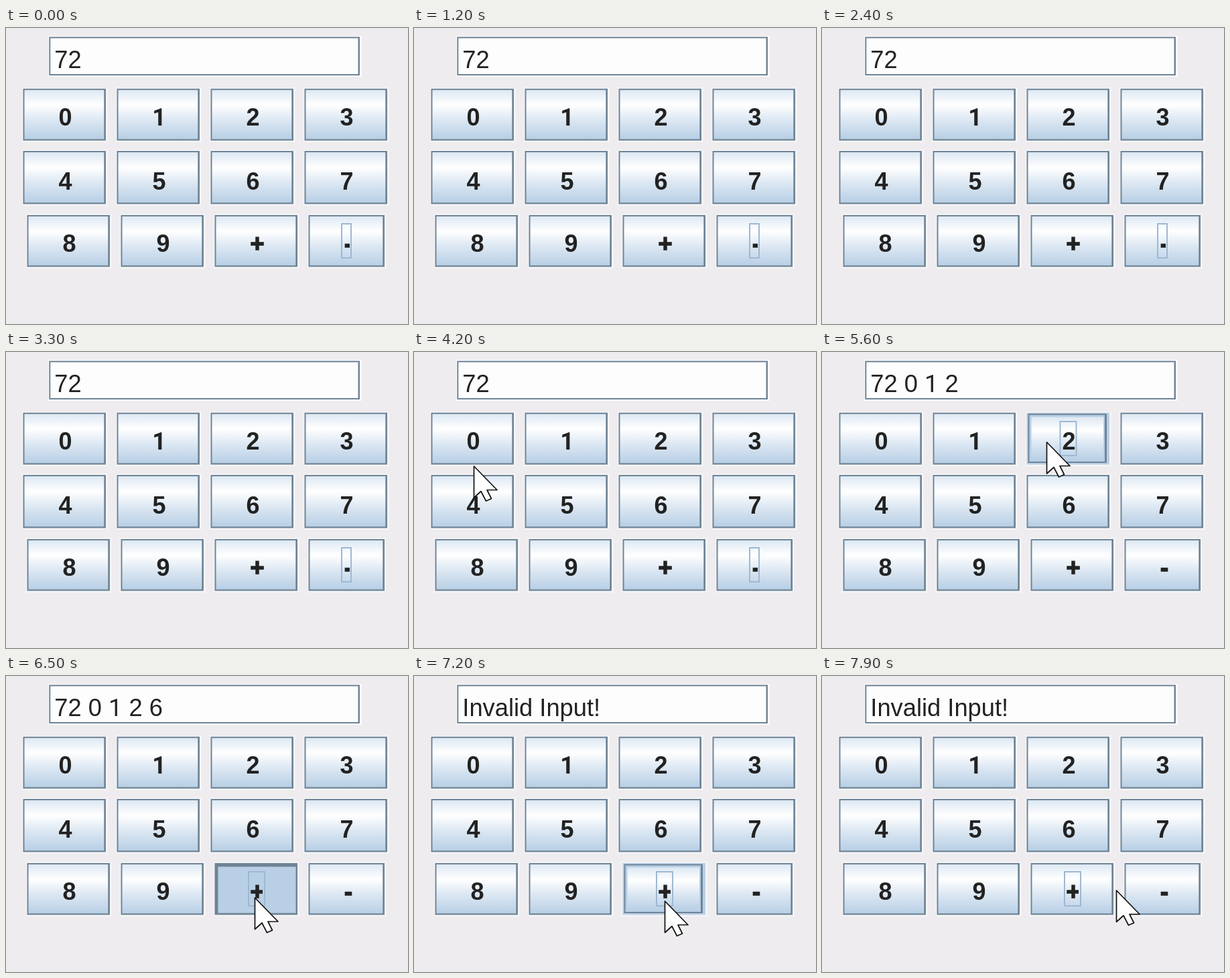
An HTML page that plays this animation: 600x443 px, repeating every 8 s.

```html
<!DOCTYPE html>
<html lang="en">
<head>
<meta charset="utf-8">
<title>Calculator keypad</title>
<style>
  html, body { margin: 0; width: 100%; height: 100%; overflow: hidden; background: #eeecee; }
  svg { display: block; width: 600px; height: 443px; }
  text { font-family: "Liberation Sans", Arial, sans-serif; fill: #222; white-space: pre; }
  .label { font-size: 36px; font-weight: bold; text-anchor: middle; }
  .sign { stroke: #222; stroke-width: 1.5px; }
  .entry { font-size: 36.3px; }
  .one { font-family: Roboto, sans-serif; }
</style>
</head>
<body>
<svg id="stage" viewBox="0 0 600 443">
  <defs>
    <linearGradient id="ocean" x1="0" y1="0" x2="0" y2="1">
      <stop offset="0" stop-color="#dde8f3"/>
      <stop offset=".3" stop-color="#fff"/>
      <stop offset=".6" stop-color="#dde8f3"/>
      <stop offset="1" stop-color="#b8cfe5"/>
    </linearGradient>
  </defs>
</svg>
<script>
const LOOP = 8000, STEP = 100;
const EDGE = '#6f8496', SOFT = '#b8cfe5';
const stage = document.getElementById('stage');

function add(parent, tag, attrs) {
  const node = document.createElementNS('http://www.w3.org/2000/svg', tag);
  for (const key in attrs) node.setAttribute(key, attrs[key]);
  parent.append(node);
  return node;
}
const box = (parent, x, y, width, height, fill, more) =>
  add(parent, 'rect', { x, y, width, height, fill, ...more });
const show = (node, on) => node.setAttribute('visibility', on ? 'visible' : 'hidden');

// The digit 1 is drawn without a foot
function write(node, text) {
  node.innerHTML = text.replace('1', '<tspan class="one">1</tspan>');
}

// Text field
box(stage, 63, 12, 468, 61, '#fbfbfc');
box(stage, 64.3, 13.3, 463.7, 57.7, EDGE);
box(stage, 66.3, 15.3, 459.2, 53.7, '#fefdfe');
const entry = add(stage, 'text', { x: 72.3, y: 59.8, class: 'entry' });

// Keys: left, top, height, baseline and labels of each row
const rows = [
  [25.5, 90.8, 77.7, 146, '0123'],
  [25.5, 184, 79.5, 242, '4567'],
  [31.5, 280, 77.5, 335, '89+-']
];

function makeKey(name, x, y, w, h, base) {
  const isSign = '+-'.includes(name);
  const cx = name === '-' ? 511 : x + (isSign ? 63.5 : 63);
  box(stage, x - 1.5, y - 1.5, w + 4, h + 4, '#f5f5f7');

  const normal = add(stage, 'g');
  box(normal, x, y, w, h, EDGE);
  box(normal, x + 2, y + 2, w - 4.7, h - 4.2, 'url(#ocean)');

  const hover = add(stage, 'g');
  box(hover, x, y, w, h, SOFT);
  box(hover, x + 2, y + 1.5, w - 6, h - 4, EDGE);
  box(hover, x + 4, y + 3.5, w - 11, h - 8, SOFT);
  box(hover, x + 7, y + 6.5, w - 16, h - 13, 'url(#ocean)');

  const down = add(stage, 'g');
  box(down, x, y, w, h, EDGE);
  box(down, x + 5, y + 5.5, w - 7.5, h - 8.3, SOFT);

  const ring = box(stage, name === '-' ? 501 : cx - 13, base - 42,
    name === '-' ? 14 : 24, 51, 'none', { stroke: '#9fb8d2', 'stroke-width': 2 });

  // A focused sign loses its right end
  const cut = { '+': 8, '-': 2 }[name] || 40;
  const clip = add(stage, 'clipPath', { id: 'cut' + name.charCodeAt() });
  box(clip, cx - 40, base - 40, 40 + cut, 60, '#000');
  const label = add(stage, 'text', { x: cx, y: base, class: isSign ? 'label sign' : 'label' });
  write(label, name);

  return {
    name,
    contains: (px, py) => px >= x && px < x + w && py >= y && py < y + h,
    paint(isDown, isOver, isFocused) {
      show(normal, !isDown && !isOver);
      show(hover, !isDown && isOver);
      show(down, isDown);
      show(ring, isFocused);
      label.setAttribute('clip-path', isFocused ? `url(#${clip.id})` : 'none');
    }
  };
}

const keys = rows.flatMap(([left, top, height, base, names]) =>
  [...names].map((name, i) =>
    makeKey(name, left + 140 * i, top, name === '-' ? 113.5 : 123.5, height, base)));

const pointer = add(stage, 'path', {
  d: 'M.5 1V48L11 38.5L18.5 53L26.5 49.5L20 36.5H35Z',
  fill: '#fff', stroke: '#111', 'stroke-width': 1.7, 'stroke-linejoin': 'round'
});

// Presses: key, down, up, entry after release
const presses = [
  ['0', 4600, 4800, '72 0'],
  ['1', 5000, 5200, '72 0 1'],
  ['2', 5400, 5500, '72 0 1 2'],
  ['6', 5900, 6100, '72 0 1 2 6'],
  ['+', 6400, 6700, 'Invalid Input!']
];

// Pointer tip: time, x, y
const path = [
  [3500, 190, 3], [3600, 165, 48], [3900, 112, 145], [4200, 89, 170],
  [4400, 92, 148], [4800, 94, 143], [5000, 238, 121], [5100, 241, 120],
  [5200, 243, 121], [5400, 331, 133], [5500, 335, 134], [5600, 335, 134],
  [5900, 355, 225], [6100, 357, 228], [6300, 370, 331], [6500, 371, 331],
  [6700, 372, 336], [7200, 374, 336], [7600, 430, 322], [7900, 439, 320]
];

function tipAt(t) {
  if (t < path[0][0]) return null;
  const i = path.findIndex(p => p[0] > t);
  if (i < 0) return path[path.length - 1].slice(1);
  const [t0, x0, y0] = path[i - 1], [t1, x1, y1] = path[i];
  const k = (t - t0) / (t1 - t0);
  return [x0 + (x1 - x0) * k, y0 + (y1 - y0) * k];
}

function draw(t) {
  let text = '72', focus = '-', held = null;
  for (const [name, start, end, result] of presses) {
    if (t >= start) focus = name;
    if (t >= start && t < end) held = name;
    if (t >= end) text = result;
  }
  write(entry, text);

  const tip = tipAt(t);
  show(pointer, tip);
  if (tip) pointer.setAttribute('transform', `translate(${tip})`);
  for (const key of keys)
    key.paint(key.name === held, !!tip && key.contains(...tip), key.name === focus);
}

const begin = performance.now();
function tick() {
  const t = (performance.now() - begin) % LOOP;
  draw(Math.floor(t / STEP) * STEP);
  requestAnimationFrame(tick);
}
tick();
</script>
</body>
</html>
```
